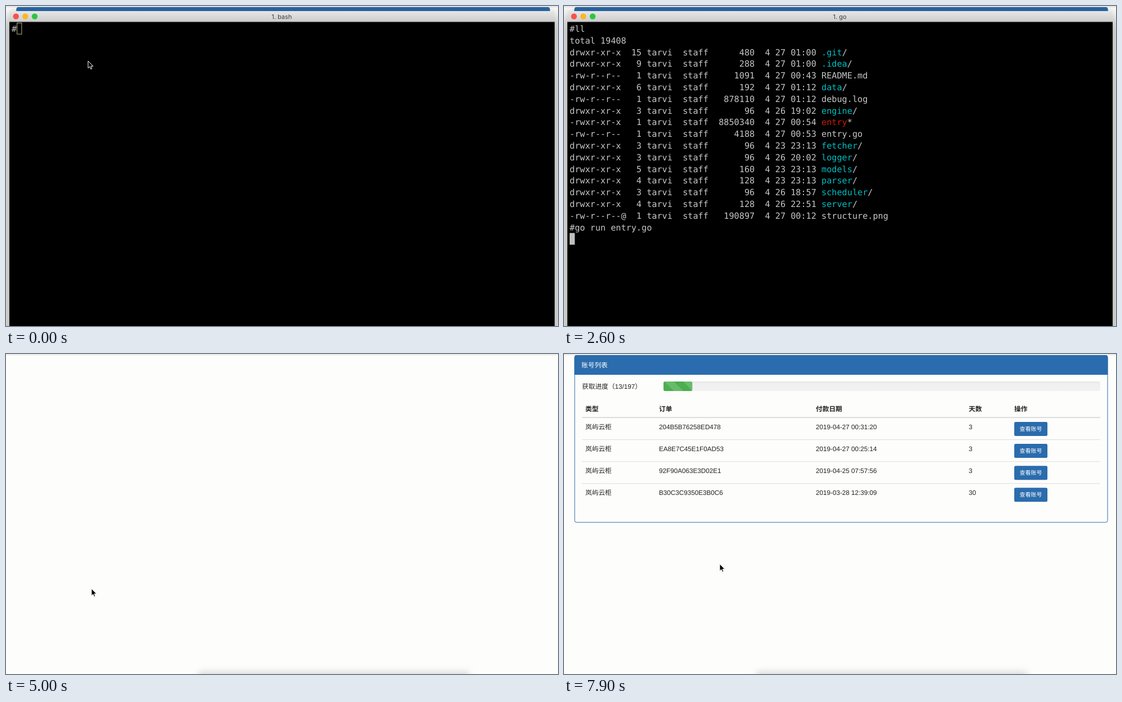
Write an HTML page that moves like this. It is 982 px wide and 570 px high and loops after 8 s.

```html
<!DOCTYPE html>
<html lang="zh">
<head>
<meta charset="utf-8">
<title>Terminal and order list</title>
<style>
html, body { margin: 0; width: 100%; height: 100%; overflow: hidden; background: #fdfdfb; }
svg { display: block; width: 982px; height: 570px; text-rendering: geometricPrecision; }
text { white-space: pre; }
#page { font: 11.7px "Liberation Sans", "Noto Sans CJK SC", "Noto Sans CJK", sans-serif; fill: #222; }
#heads { font-weight: 700; }
#term { font: 15.2px "DejaVu Sans Mono", monospace; fill: #c7c7c7; }
#title { font: 11px Inter, sans-serif; fill: #404040; text-anchor: middle; }
#window { filter: drop-shadow(0 9px 13px rgba(0, 0, 0, .5)); }
#dock { filter: blur(6px); }
.dir { fill: #00bfc2; }
.exe { fill: #c91b00; }
.link { fill: #1d62b8; }
.btn { font-size: 10px; fill: #fff; text-anchor: middle; }
</style>
</head>
<body>
<svg viewBox="0 0 982 570">
  <defs>
    <linearGradient id="bar" x2="0" y2="1">
      <stop stop-color="#e6e6e6"/><stop offset="1" stop-color="#cdcdcd"/>
    </linearGradient>
    <linearGradient id="track" x2="0" y2="1">
      <stop stop-color="#e4e4e4"/><stop offset=".2" stop-color="#f0f0f0"/><stop offset="1" stop-color="#f2f2f2"/>
    </linearGradient>
    <pattern id="stripes" width="33.4" height="33.4" patternUnits="userSpaceOnUse">
      <path d="M0 0H16.7L33.4 16.7V33.4ZM0 16.7L16.7 33.4H0Z" fill="#fff" fill-opacity=".16"/>
    </pattern>
  </defs>

  <g id="page">
    <rect width="982" height="570" fill="#fdfdfb"/>
    <rect y="1" width="982" height="1" fill="#d9d9d9"/>
    <rect id="dock" x="343" y="566" width="480" height="24" fill="#d9d9de"/>
    <g id="panel">
      <rect id="frame" x="19" y="2.5" width="948" height="141" rx="3.5" fill="#fdfdfb" stroke="#2b6dae"/>
      <path d="M18.5 37V6a4 4 0 0 1 4-4H963.5a4 4 0 0 1 4 4V37Z" fill="#2a6cad"/>
      <text x="31" y="23.8" fill="#fff">账号列表</text>
      <text id="progress" x="32" y="61.8"></text>
      <rect x="177" y="49" width="777" height="17" rx="3" fill="url(#track)"/>
      <g id="done">
        <rect class="fill" x="177" y="49" height="17" rx="3" fill="#4bae4f"/>
        <rect class="fill" x="177" y="49" height="17" rx="3" fill="url(#stripes)"/>
      </g>
      <g id="heads"></g>
      <rect x="32" y="112.3" width="922" height="1.7" fill="#d8d8d8"/>
      <g id="orders"></g>
    </g>
  </g>

  <g id="desk">
    <g id="window">
      <path d="M6 570V13a4 4 0 0 1 4-4H972a4 4 0 0 1 4 4V590H6Z" fill="url(#bar)"/>
      <rect x="6" y="28" width="970" height="562" fill="#000"/>
    </g>
    <path d="M6 28V13a4 4 0 0 1 4-4H972a4 4 0 0 1 4 4V28Z" fill="url(#bar)"/>
    <rect x="6" y="27.5" width="970" height="1" fill="#a9a9a9"/>
    <circle cx="17.7" cy="18.5" r="5.2" fill="#f4544d"/>
    <circle cx="34.3" cy="18.5" r="5.2" fill="#fab726"/>
    <circle cx="51" cy="18.5" r="5.2" fill="#2bc640"/>
    <text id="title" x="490.5" y="22.8"></text>
    <g id="term"></g>
    <rect id="underline" x="55.8" y="423" width="238" height="1.2" class="link"/>
    <rect id="caret" width="9.2" height="20.8"/>
  </g>

  <g id="pointer">
    <path id="arrow" d="M0 0V12.6L2.9 9.9L4.9 14.4L6.9 13.5L5 9.2H9Z" fill="#000" stroke="#fff"/>
    <path id="beam" d="M-3.5 -6.5Q0 -6.5 0 -4.5Q0 -6.5 3.5 -6.5M0 -4.5V4.5M-3.5 6.5Q0 6.5 0 4.5Q0 6.5 3.5 6.5M-1.5 2.5H1.5" fill="none" stroke="#d8d8d8"/>
    <path id="hand" d="M-3 -6.4Q-1.6 -7.6 -.7 -6L.6 -2.4Q2.6 -3.2 3.2 -1.8Q5 -2 5.2 -.4Q6.8 0 6.4 2.4L5 6.8H-.8L-4.6 2.2Q-5.4 .2 -3.4 .6L-1.8 1.8L-3.6 -4.6Q-4 -5.8 -3 -6.4Z" fill="#fff" stroke="#000" stroke-width=".8"/>
  </g>
</svg>

<script>
const LOOP = 8000, STEP = 100;
const CELL = 9.152, LINE = 20.81, LEFT = 10, TOP = 30.1;
const $ = id => document.getElementById(id);
const show = (el, on) => el.setAttribute('visibility', on ? 'inherit' : 'hidden');
const attrs = (el, map) => { for (const k in map) el.setAttribute(k, map[k]); };

// Terminal contents
const files = `drwxr-xr-x 15 480 27 01:00 .git/
drwxr-xr-x 9 288 27 01:00 .idea/
-rw-r--r-- 1 1091 27 00:43 README.md
drwxr-xr-x 6 192 27 01:12 data/
-rw-r--r-- 1 878110 27 01:12 debug.log
drwxr-xr-x 3 96 26 19:02 engine/
-rwxr-xr-x 1 8850340 27 00:54 entry*
-rw-r--r-- 1 4188 27 00:53 entry.go
drwxr-xr-x 3 96 23 23:13 fetcher/
drwxr-xr-x 3 96 26 20:02 logger/
drwxr-xr-x 5 160 23 23:13 models/
drwxr-xr-x 4 128 23 23:13 parser/
drwxr-xr-x 3 96 26 18:57 scheduler/
drwxr-xr-x 4 128 26 22:51 server/
-rw-r--r--@ 1 190897 27 00:12 structure.png`;

const paint = name => name
  .replace(/^(.+)\/$/, '<tspan class="dir">$1</tspan>/')
  .replace(/^(.+)\*$/, '<tspan class="exe">$1</tspan>*');

const listing = files.split('\n').map(row => {
  const [mode, links, size, day, time, name] = row.split(' ');
  return `${mode.padEnd(11)} ${links.padStart(2)} tarvi  staff  ${size.padStart(7)}  4 ${day} ${time} ${paint(name)}`;
});

const lines = ['', 'total 19408', ...listing, '',
  'open <tspan id="url">http://localhost:8000/home</tspan>',
  'crawler engine runing...', 'mkdir ok:./data/contact_json'];
$('term').innerHTML = lines.map((s, i) =>
  `<text x="${LEFT}" y="${(TOP + i * LINE + 15.8).toFixed(2)}">${s}</text>`).join('');
const rows = [...$('term').children];
const PROMPT = 17, OUTPUT = 18;

// Order table
const heads = ['类型', '订单', '付款日期', '天数', '操作'];
const emptyCols = [38, 201, 364, 632, 796], fullCols = [38, 169, 448, 720, 801];
$('heads').innerHTML = heads.map(h => `<text y="101.8">${h}</text>`).join('');

const ROW = 39.1;
const orders = [
  ['204B5B76258ED478', '2019-04-27 00:31:20', 3],
  ['EA8E7C45E1F0AD53', '2019-04-27 00:25:14', 3],
  ['92F90A063E3D02E1', '2019-04-25 07:57:56', 3],
  ['B30C3C9350E3B0C6', '2019-03-28 12:39:09', 30]];
$('orders').innerHTML = orders.map((o, i) => {
  const cells = ['岚屿云柜', ...o].map((c, k) => `<text x="${fullCols[k]}" y="133.6">${c}</text>`).join('');
  const rule = i ? '<rect x="32" y="113" width="922" height="1" fill="#dcdcdc"/>' : '';
  return `<g transform="translate(0 ${(i * ROW).toFixed(1)})">${rule}${cells}
    <rect x="801" y="121" width="59" height="25" rx="2.5" fill="#2a6cad"/>
    <text class="btn" x="830.5" y="137.2">查看账号</text></g>`;
}).join('');

// Pointer path: time, x, y
const path = [[0, 146, 98], [2900, 146, 105], [3500, 110, 382], [3700, 110, 382], [4500, 153, 424],
  [4900, 153, 424], [5000, 152, 418], [5200, 152, 418], [5500, 277, 374], [LOOP, 277, 374]];

function pointerAt(t) {
  const i = path.findIndex(p => p[0] > t);
  const [t0, x0, y0] = path[i - 1], [t1, x1, y1] = path[i];
  const u = (t - t0) / (t1 - t0), e = u * u * (3 - 2 * u);
  return [x0 + (x1 - x0) * e, y0 + (y1 - y0) * e];
}

const typed = (text, t, from, to) =>
  text.slice(0, Math.max(0, Math.round((t - from) / (to - from) * text.length)));

function drawTerminal(t) {
  const listed = t >= 500, running = t >= 1500, printed = t >= 2900, hover = t >= 4700;
  rows[0].textContent = '#' + typed('ll', t, 200, 400);
  rows[PROMPT].textContent = '#' + typed('go run entry.go', t, 700, 1300);
  rows.forEach((r, i) => show(r, !i || (i < OUTPUT ? listed : printed)));
  $('title').textContent = '1. ' + (!running ? 'bash' : t < 3700 ? 'go' : 'entry');
  $('url').setAttribute('class', hover ? 'link' : '');
  show($('underline'), hover);

  const row = printed ? 21 : running ? OUTPUT : listed ? PROMPT : 0;
  const col = running ? 0 : rows[row].textContent.length;
  const idle = t < 200, inset = idle ? .5 : 0;
  attrs($('caret'), {
    x: LEFT + col * CELL + inset, y: TOP + row * LINE + inset - .3,
    width: 9.2 - 2 * inset, height: 20.8 - 2 * inset,
    fill: idle ? 'none' : '#bfbfbf', stroke: idle ? '#b5b58c' : 'none'
  });
}

function drawPanel(t) {
  const age = Math.max(0, t - 5700);
  const count = Math.round(age / 2200 * 13), total = age ? 197 : 0;
  const found = Math.min(4, Math.floor(age / 200));
  const cols = found ? fullCols : emptyCols;
  $('progress').textContent = `获取进度（${count}/${total}）`;
  document.querySelectorAll('.fill').forEach(r => r.setAttribute('width', 777 * count / 197));
  $('stripes').setAttribute('patternTransform', `translate(${177 - t % 2000 / 2000 * 33.4} 49)`);
  [...$('heads').children].forEach((h, i) => h.setAttribute('x', cols[i]));
  [...$('orders').children].forEach((o, i) => show(o, i < found));
  $('frame').setAttribute('height', 141 + found * ROW);
}

function draw() {
  const t = Math.floor(performance.now() % LOOP / STEP) * STEP;
  const desk = t < 5000;
  show($('desk'), desk);
  show($('panel'), desk || t >= 5700);
  if (desk) drawTerminal(t);
  drawPanel(t);

  const [x, y] = pointerAt(t);
  $('pointer').setAttribute('transform', `translate(${x.toFixed(1)} ${y.toFixed(1)})`);
  show($('arrow'), t < 300 || !desk);
  show($('beam'), t >= 2900 && t < 4700);
  show($('hand'), t >= 4700 && desk);
  requestAnimationFrame(draw);
}
draw();
</script>
</body>
</html>
```
